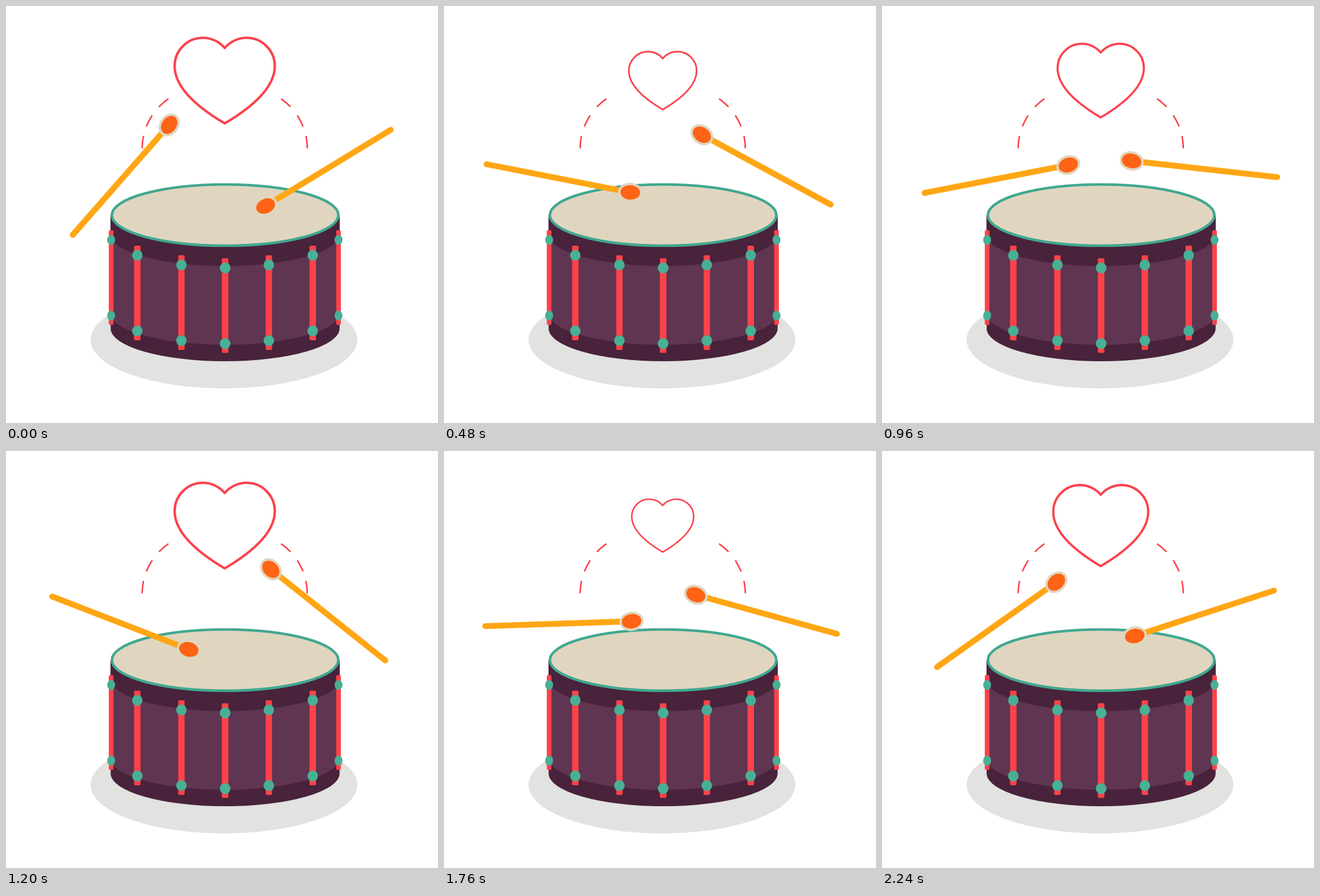
Write an HTML page with a canvas that moves like this. It is 761 by 736 pixels and loops after 2.32 s.

```html
<!DOCTYPE html>
<html lang="en">
<head>
<meta charset="utf-8">
<title>Drum</title>
<style>
html, body { margin: 0; width: 100%; height: 100%; overflow: hidden; background: #fff; }
canvas { display: block; }
</style>
</head>
<body>
<canvas id="stage" width="761" height="736"></canvas>
<script>
const ctx = document.getElementById('stage').getContext('2d');
const LOOP = 2320, STEP = 80, TAU = Math.PI * 2, MID = 385.3;
const RED = '#fb434d', ROD = '#ff4249', TEAL = '#48b094', RIM = '#41a890',
  DARK = '#48233b', PLUM = '#5f3552', SKIN = '#e0d6c0', WOOD = '#ffa614', TIP = '#ff6315';

// [step, value] pairs; one swing of the sticks is 1
const swingKeys = [[0, 0], [6, 1.144], [10, 2.099], [13, 2.76], [15, 3],
  [19, 3.95], [22, 4.67], [27, 5.85], [28, 6.19], [29, 6.2]];
const heartKeys = [[0, 1], [7.2, .613], [14, .965], [15, 1], [22, .619],
  [22.1, .617], [28, .948], [29, 1]];

const rad = deg => deg * Math.PI / 180;

function valueAt(keys, x) {
  let i = 1;
  while (i < keys.length - 1 && keys[i][0] < x) i++;
  const [x0, y0] = keys[i - 1], [x1, y1] = keys[i];
  return y0 + (y1 - y0) * (x - x0) / (x1 - x0);
}

function triangle(q) {
  const m = q % 2;
  return m < 1 ? m : 2 - m;
}

function oval(x, y, rx, ry, color, tilt = 0) {
  ctx.fillStyle = color;
  ctx.beginPath();
  ctx.ellipse(x, y, rx, ry, tilt, 0, TAU);
  ctx.fill();
}

// Cylinder wall between two curved edges
function wall(top, bottom, rx, ryTop, ryBottom, color) {
  ctx.fillStyle = color;
  ctx.beginPath();
  ctx.ellipse(386, top, rx, ryTop, 0, Math.PI, 0, true);
  ctx.lineTo(386 + rx, bottom);
  ctx.ellipse(386, bottom, rx, ryBottom, 0, 0, Math.PI);
  ctx.closePath();
  ctx.fill();
}

function lug(x, y, w, rx, ry) {
  ctx.fillStyle = ROD;
  ctx.beginPath();
  ctx.roundRect(x - w / 2, y - 17, w, 167, 2);
  ctx.fill();
  oval(x, y, rx, ry, TEAL);
  oval(x, y + 133.5, rx, ry, TEAL);
}

function drum() {
  oval(384, 589, 235, 86, '#e2e2e0');
  ctx.fillStyle = DARK;
  ctx.fillRect(184.3, 369, 403.4, 60);
  wall(369, 569, 201.7, 54, 58, DARK);
  wall(403, 542, 201.7, 56, 56, PLUM);
  oval(386, 369, 199.5, 54, SKIN);
  ctx.strokeStyle = RIM;
  ctx.lineWidth = 4.6;
  ctx.stroke();
  for (const side of [-1, 1]) {
    lug(385.5 + side * 200.3, 412.8, 8.2, 7, 8.6);
    lug(385.8 + side * 154.5, 440, 11.4, 9.2, 9.5);
    lug(386 + side * 77, 457, 11.2, 9.2, 9.5);
  }
  lug(386, 462.3, 11.4, 9.4, 9.6);
}

function dashes(side) {
  ctx.save();
  ctx.translate(MID, 252);
  ctx.scale(side, 1);
  ctx.strokeStyle = RED;
  ctx.lineWidth = 2.7;
  ctx.lineCap = 'round';
  for (const a of [1, 22.2, 44.2]) {
    ctx.beginPath();
    ctx.arc(-38.3, 0, 107.2, rad(180 + a), rad(180 + a + 10.6));
    ctx.stroke();
  }
  ctx.restore();
}

function heart(size) {
  ctx.save();
  ctx.translate(MID, 131.7);
  ctx.scale(size, size);
  ctx.beginPath();
  ctx.moveTo(0, -57.5);
  ctx.bezierCurveTo(-9.5, -69, -24, -75.5, -38.5, -75.5);
  ctx.bezierCurveTo(-66, -75.5, -88.2, -53, -88.2, -25.5);
  ctx.bezierCurveTo(-88.2, 15, -43, 50, 0, 75.5);
  ctx.bezierCurveTo(43, 50, 88.2, 15, 88.2, -25.5);
  ctx.bezierCurveTo(88.2, -53, 66, -75.5, 38.5, -75.5);
  ctx.bezierCurveTo(24, -75.5, 9.5, -69, 0, -57.5);
  ctx.closePath();
  ctx.strokeStyle = RED;
  ctx.lineWidth = 4.3;
  ctx.lineJoin = 'round';
  ctx.stroke();
  ctx.restore();
}

function stick(x, y, side, deg) {
  ctx.save();
  ctx.translate(x, y);
  ctx.scale(side, 1);
  ctx.rotate(rad(deg));
  ctx.strokeStyle = WOOD;
  ctx.lineWidth = 10.4;
  ctx.lineCap = 'round';
  ctx.beginPath();
  ctx.moveTo(-132, 0);
  ctx.lineTo(112, 0);
  ctx.stroke();
  oval(126, 0, 21.5, 17, SKIN, rad(-7));
  oval(126, 0, 17.3, 12.8, TIP, rad(-7));
  ctx.restore();
}

function draw(now) {
  const step = Math.floor((now % LOOP) / STEP);
  const angle = -48.8 + 70 * triangle(valueAt(swingKeys, step));
  ctx.fillStyle = '#fff';
  ctx.fillRect(0, 0, 761, 736);
  drum();
  dashes(1);
  dashes(-1);
  heart(valueAt(heartKeys, step));
  stick(204.5, 304.7, 1, angle);
  stick(565, 287.4, -1, -17.4 - angle);
}

let start;
function tick(now) {
  if (start === undefined) start = now;
  draw(now - start);
  requestAnimationFrame(tick);
}
draw(0);
requestAnimationFrame(tick);
</script>
</body>
</html>
```
